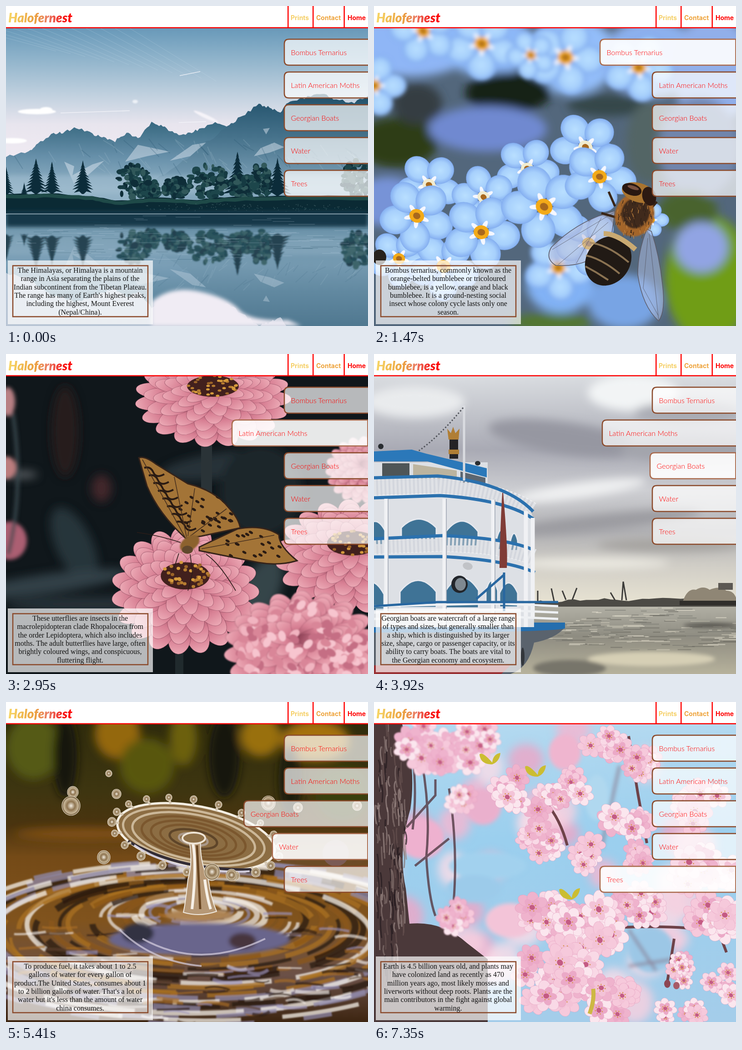
An HTML page that plays this animation: 796x703 px, repeating every 8110 ms.

```html
<!DOCTYPE html>
<html lang="en">
<head>
<meta charset="utf-8">
<title>Halofernest</title>
<style>
html, body { margin: 0; width: 100%; height: 100%; overflow: hidden; background: #fff; }
svg { display: block; width: 100%; height: 100%; }
.nav { font: 700 14px Inter, sans-serif; }
.logo { font: italic 900 28px Lato, sans-serif; }
.menu { font: 300 16px Lato, sans-serif; fill: #f00; }
.caption { font: 16px "Liberation Serif", serif; fill: #111; text-anchor: middle; }
</style>
</head>
<body>
<svg id="stage" viewBox="0 0 796 703" xmlns="http://www.w3.org/2000/svg"></svg>
<script>
const LOOP = 8110, STEP = 45.5, SLIDE = 500, REACH = 115;
const cuts = [1010, 2440, 3920, 5410, 6840];
const starts = [982, 2424, 3890, 5325, 6830];
const labels = ['Bombus Ternarius', 'Latin American Moths', 'Georgian Boats', 'Water', 'Trees'];
const captions = [
  "The Himalayas, or Himalaya is a mountain|range in Asia separating the plains of the|Indian subcontinent from the Tibetan Plateau.|The range has many of Earth's highest peaks,|including the highest, Mount Everest|(Nepal/China).",
  'Bombus ternarius, commonly known as the|orange-belted bumblebee or tricoloured|bumblebee, is a yellow, orange and black|bumblebee. It is a ground-nesting social|insect whose colony cycle lasts only one|season.',
  'These utterflies are insects in the|macrolepidopteran clade Rhopalocera from|the order Lepidoptera, which also includes|moths. The adult butterflies have large, often|brightly coloured wings, and conspicuous,|fluttering flight.',
  'Georgian boats are watercraft of a large range|of types and sizes, but generally smaller than|a ship, which is distinguished by its larger|size, shape, cargo or passenger capacity, or its|ability to carry boats. The boats are vital to|the Georgian economy and ecosystem.',
  "To produce fuel, it takes about 1 to 2.5|gallons of water for every gallon of|product.The United States, consumes about 1|to 2 billion gallons of water. That's a lot of|water but it's less than the amount of water|china consumes.",
  'Earth is 4.5 billion years old, and plants may|have colonized land as recently as 470|million years ago, most likely mosses and|liverworts without deep roots. Plants are the|main contributors in the fight against global|warming.'
];

// Drawing helpers
let state = 4217;
const rand = () => (state = state * 16807 % 2147483647) / 2147483647;
const pick = list => { const all = list.split(' '); return all[Math.floor(rand() * all.length)]; };
const times = (n, fn) => Array.from({ length: n }, (_, i) => fn(i)).join('');
const path = (d, fill, more = '') => `<path d="${d}" fill="${fill}" ${more}/>`;
const line = (d, color, w, more = '') => path(d, 'none', `stroke="${color}" stroke-width="${w}" ${more}`);
const oval = (x, y, rx, ry, fill, turn = 0, more = '') =>
  `<ellipse cx="${x}" cy="${y}" rx="${rx}" ry="${ry}" fill="${fill}" transform="rotate(${turn} ${x} ${y})" ${more}/>`;
const box = (x, y, w, h, fill, more = '') => `<rect x="${x}" y="${y}" width="${w}" height="${h}" fill="${fill}" ${more}/>`;
const at = (x, y, body, more = '') => `<g transform="translate(${x} ${y}) ${more}">${body}</g>`;
const soft = (r, body) => `<g filter="url(#blur${r})">${body}</g>`;
const each = (text, fn) => text.split(',').map(s => fn(...s.trim().split(' ').map(v => isNaN(v) ? v : +v))).join('');
const blobs = text => each(text, oval);
const fade = (id, stops) => '<linearGradient id="' + id + '" gradientUnits="userSpaceOnUse" x1="0" x2="0" y1="0" y2="703">' +
  each(stops, (y, c) => `<stop offset="${y / 703}" stop-color="${c}"/>`) + '</linearGradient>';
const back = fill => box(0, 49, 796, 654, fill);
const scatter = (n, x, y, rx, ry, fn) => times(n, () => {
  const a = rand() * 7, q = Math.sqrt(rand());
  return fn(x + Math.cos(a) * q * rx, y + Math.sin(a) * q * ry);
});
const ring = (n, dist, rx, ry, fill, more = '') => times(n, i =>
  `<ellipse cx="${dist}" rx="${rx}" ry="${ry}" fill="${fill}" transform="rotate(${i * 360 / n})" ${more}/>`);

function ridge(text, rough) {
  const p = text.split(' ').map(s => s.split(',').map(Number));
  return 'M' + p[0] + p.slice(1).map(([x, y], i) => times(6, k => {
    const f = (k + 1) / 6, [u, v] = p[i];
    return `L${u + (x - u) * f} ${v + (y - v) * f + (rand() - .5) * rough}`;
  })).join('');
}

function conifer(x, y, h) {
  let right = '', left = '';
  for (let i = 1; i < 11; i++) {
    const w = h * .033 * i * (.75 + rand() * .4), v = y - h + h * i / 11;
    right += `L${x + w} ${v + 4}L${x + w * .4} ${v + 1}`;
    left = `L${x - w * .4} ${v + 1}L${x - w} ${v + 4}` + left;
  }
  return path(`M${x} ${y - h}${right}L${x + 2} ${y}H${x - 2}${left}Z`, '#0c2c3a');
}

const bush = (x, y, rx, ry) => scatter(90, x, y, rx, ry, (u, v) =>
  oval(u, v, 3 + rand() * 6, 3 + rand() * 5, pick('#0e2d38 #153a42 #1d464b #31585a')));

function mountains() {
  const land =
    path(ridge('0,332 50,320 70,303 105,279 125,279 155,266 190,282 215,288 240,297 265,280 290,291 320,257 345,262 370,281 400,280 425,272 460,255 490,264 600,330', 7) + 'V460H0Z', 'url(#far)') +
    path(ridge('310,395 390,340 440,300 490,264 520,240 556,217 580,222 600,236 620,212 650,205 690,191 720,202 760,214 796,196', 7) + 'V460H310Z', 'url(#near)') +
    path('M128 342L150 352L146 372L190 348L216 340L180 372L150 392ZM290 305L360 320L310 330L262 342ZM410 305L440 300L405 330L360 340ZM545 330L560 312L590 300L612 310L580 322ZM565 270L580 268L572 282Z', '#e4ebf3', 'opacity=".45"') +
    scatter(60, 400, 325, 390, 35, (x, y) => line(`M${x} ${y}l${8 + rand() * 22} ${12 + rand() * 18}`, pick('#214e69 #a9c2d2'), 2, 'opacity=".22"')) +
    soft(8, box(0, 372, 796, 40, '#a5c0d2', 'opacity=".5"'));
  const woods = each('0 415 62,40 415 28,66 413 78,101 412 70,169 413 74,509 418 98,597 417 84', conifer) +
    each('279 386 36 38,318 404 18 20,372 400 26 24,445 386 44 38,520 396 26 28,560 384 20 40,770 380 32 42', bush);
  return fade('dawn', '49 #6899b9,120 #92b5cc,200 #c3d2e0,260 #e8e5ee,340 #f1ebf3') +
    fade('far', '255 #376880,330 #668fa9,400 #92b2c6') + fade('near', '195 #20506a,290 #47738c,400 #83a6bc') +
    fade('lake', '457 #133c4a,490 #4e7a92,570 #84a6bc,703 #7f9fb5') + back('url(#dawn)') +
    times(12, i => line(`M${-80 + i * 32} 49l190 ${50 + i * 6}`, '#d7e7f2', 1, 'opacity=".22"')) +
    soft(3, blobs('68 232 42 6 #fff,88 228 14 6 #fff,14 296 32 6 #fff,284 210 6 4 #edf1f7,440 243 30 4 #f5f3f8 25')) +
    line('M120 235L272 230M382 153L427 144M380 256L440 254', '#f5f5fa', 1.6, 'opacity=".8"') +
    `<g id="land">${land}</g><g id="woods">${woods}</g>` +
    path(ridge('0,413 100,412 190,418 240,428 330,421 420,426 480,420 620,417 796,417', 3) + 'V460H0Z', '#0b2a34') +
    line(ridge('0,418 100,417 190,423 240,433 330,426 420,431 480,425 620,422 796,422', 3), '#1f4a48', 8) +
    scatter(120, 520, 443, 270, 9, (x, y) => oval(x, y, 1, 1, '#527073', 0, 'opacity=".6"')) +
    box(0, 457, 796, 246, '#e9e5ef') + '<g transform="translate(0 918) scale(1 -1)"><use href="#land"/></g>' +
    box(0, 457, 796, 246, 'url(#lake)', 'opacity=".45"') +
    soft(8, path('M320 703V650Q360 615 420 626Q490 640 515 670Q540 693 620 690L650 703Z', '#f0ecf4') + box(0, 450, 796, 35, '#12394a')) +
    soft(3, '<g transform="translate(0 896) scale(1 -.95)" opacity=".8"><use href="#woods"/></g>') +
    box(0, 456, 796, 1.5, '#c3d6e0', 'opacity=".8"') +
    scatter(150, 400, 510, 400, 52, (x, y) => line(`M${x} ${y}h${15 + rand() * 50}`, pick('#c4d8e4 #1d4a5d'), 1, 'opacity=".28"'));
}

const bloom = (x, y, r, turn = 0, pale = 0) => at(x, y,
  ring(5, r * .59, r * .43, r * .4, 'url(#sepal)', 'stroke="#7ba6e8" stroke-opacity=".5"') + ring(5, r * .2, r * .15, r * .06, '#f5f7ff') +
  oval(0, 0, r * .2, r * .19, pale ? '#f1ecd0' : '#f3aa18') + oval(0, 0, r * .1, r * .09, '#a8681d'), `rotate(${turn}) scale(1 .95)`);

function bee() {
  const wing = 'fill-opacity=".55" stroke="#5b5a66" stroke-width="1.5"';
  return path('M530 450Q450 470 390 530Q375 555 400 570Q480 575 520 520Z', '#bcc0da', wing) +
    path('M600 490Q580 540 580 590Q590 660 626 692Q642 670 634 610Q628 550 610 495Z', '#aebde2', wing) +
    line('M530 452L392 535M515 475L405 568M500 465L445 565M605 500L626 690M602 510L592 620L625 680', '#51505c', 1, 'opacity=".7"') +
    line('M535 465L500 455M530 440L516 408M605 450L622 430', '#392516', 5) + oval(515, 560, 48, 57, '#211a15', 35) +
    line('M475 520Q515 525 560 563M466 548Q500 555 540 588M465 572Q490 585 515 602', '#a68a62', 4, 'opacity=".8"') +
    line('M505 500Q535 500 575 535', '#c9aa72', 11) + soft(3, blobs('573 459 43 48 #a36529 20,575 455 31 34 #3f2a1d 20')) +
    scatter(80, 573, 462, 42, 46, (x, y) => line(`M${x} ${y}l${rand() * 6 - 3} 7`, pick('#c58840 #7b4d25 #2e2018'), 1.3)) +
    blobs('582 410 38 21 #a9742f 16,567 403 22 13 #281811 18,605 418 15 21 #2d1a12 -15,570 399 13 4 #795140 18');
}

function flowers() {
  return '<radialGradient id="sepal"><stop stop-color="#b9dfff"/><stop offset=".65" stop-color="#a7d0fc"/><stop offset="1" stop-color="#86b0f1"/></radialGradient>' + back('#53677c') +
    soft(20, blobs('80 80 150 75 #8fb6f6,250 85 100 70 #8db8f8,435 110 100 85 #93bdf9,610 115 110 85 #8cb0ee,745 140 90 120 #91afea,295 190 95 45 #182015,50 300 90 55 #2f3e12,95 215 55 45 #343c42,515 218 90 24 #35464a,250 270 130 50 #7089d0,605 300 50 90 #536565,715 310 90 110 #7185ac,735 600 95 140 #709d13,690 450 65 45 #4a632d,410 610 75 65 #82b2f5,550 650 80 60 #78a4e4,720 530 58 55 #91a4e3,30 430 75 55 #7793d7,390 695 90 20 #52772f')) +
    soft(8, each('237 83 82 20,421 113 85 5,108 55 75 40,582 135 78 10,0 175 70,345 108 55 30,405 575 75 12', bloom)) +
    each('472 522 72 20,121 393 72 20 1,465 310 78 25 1,337 357 70 10 1,55 555 66 15,153 572 78 20,241 420 70 40 1,610 470 38,94 461 82 24,236 497 84 8,374 441 94 33,496 375 80 10', bloom) +
    oval(12, 552, 15, 17, '#27221d') + bee();
}

function zinnia(x, y, r, squash, heart = 1) {
  return at(x, y, times(6, i => at(0, -i * r * .04, ring(19 - i * 2, r * (.78 - i * .12), r * .25, r * (.155 - i * .008), 'url(#pink)',
    'stroke="#75344a" stroke-opacity=".5"'), `rotate(${i * 11 + rand() * 8})`)) +
    (heart ? oval(0, -r * .24, r * .34, r * .22, '#42201d') +
      scatter(38, 0, -r * .25, r * .33, r * .22, (u, v) => oval(u, v, 4, 4, pick('#d59a3c #9c6428 #b77d31'))) : ''), `scale(1 ${squash})`);
}

function butterfly() {
  const wings = 'M292 228Q305 223 330 242L400 285Q460 300 490 338Q512 362 515 382L430 400L395 405Q335 350 310 290ZM425 424L510 384Q565 374 600 397Q600 422 640 454Q600 466 555 458L425 432Z';
  const spot = (x, y) => oval(x, y, 5, 2.7, '#2a1b13', 30);
  return `<clipPath id="wings"><path d="${wings}"/></clipPath>` + path(wings, '#a37437', 'stroke="#35231a" stroke-width="3"') +
    `<g clip-path="url(#wings)">${scatter(30, 445, 350, 65, 45, spot)}${scatter(24, 555, 425, 80, 34, spot)}` +
    times(8, i => line(`M${304 + i * 10} ${250 + i * 17}q14 -4 20 10t24 4`, '#2a1b13', 4)) +
    line('M395 405L300 232M397 402L370 270M400 400L415 295M405 400L485 340M430 428L590 398', '#49311f', 1.6) + '</g>' +
    soft(3, oval(404, 416, 24, 15, '#8c622d', -35)) + oval(399, 430, 12, 9, '#61482d') +
    line('M384 414Q330 397 288 392M440 440Q470 460 505 520M380 438L368 475M405 440L410 480L400 520', '#2b1d19', 1.6);
}

function moths() {
  return '<linearGradient id="pink"><stop stop-color="#8c3f54"/><stop offset=".55" stop-color="#d77f93"/><stop offset="1" stop-color="#eca9b5"/></linearGradient>' + back('#10171b') +
    soft(20, blobs('130 170 30 100 #271d1d,210 295 22 30 #42272b,470 245 130 28 #263337 -8,150 420 40 90 #25343a -25,90 505 180 22 #334147 -8,560 520 40 80 #344449 25,560 300 90 100 #1c272b,30 265 40 8 #5e6367,200 550 200 18 #263238')) +
    soft(8, blobs('8 410 38 42 #ab5e72,4 105 16 32 #b88084,2 250 20 25 #bb7d7e') + line('M15 130Q40 300 5 440', '#3b4a50', 7)) +
    box(429, 165, 24, 150, '#2a3337') + box(372, 630, 18, 73, '#202a2d') +
    soft(3, zinnia(785, 255, 80, .9, 0)) + each('455 96 167 .63,762 445 165 .74,394 520 158 .86', zinnia) +
    soft(3, zinnia(652, 650, 168, .75, 0) + scatter(120, 652, 645, 145, 95, (x, y) => oval(x, y, 12, 8, pick('#f1b4c0 #d98698 #f7c5cf #c56e84'), rand() * 180))) + butterfly();
}

function boats() {
  const rail = d => line(d, '#f7f7f8', 36, 'stroke-dasharray="5 4"') + line(d, '#c9cdd5', 34, 'opacity=".5"');
  const arch = (x, y, w, h) => path(`M${x} ${y + h}V${y + h * .45}Q${x + w / 2} ${y - h * .35} ${x + w} ${y + h * .45}V${y + h}Z`, '#3f7396', 'stroke="#e5e8ee" stroke-width="3"');
  return fade('grey', '49 #d9dce0,140 #bfc1c8,210 #a9aab4,300 #cdced2,390 #b2b2b5,470 #d2cfc7,553 #e9e4d3') +
    fade('river', '553 #b2b0a5,620 #8e8c81,703 #b7b29c') + back('url(#grey)') +
    soft(20, blobs('570 85 100 40 #f2f4f5,90 105 110 35 #e9ebed,420 185 170 35 #9697a1 8,700 210 160 28 #a3a4ac,450 300 150 17 #eff0f1 -8,500 370 220 18 #9b9ba0 -6,690 130 120 25 #a9abb3,480 460 170 12 #eceae2,650 420 160 14 #a4a29f')) +
    path(ridge('350,542 400,544 480,538 560,541 650,535 796,540', 5) + 'V556H350Z', '#4c4a45') +
    line('M545 541L548 500L555 541M390 515L396 543M360 520V543M414 520L422 540M436 540L446 514M520 524L530 541', '#3c3b39', 3) +
    path('M680 541Q690 514 708 518Q724 508 738 518Q760 508 775 520Q790 520 796 535V545H680Z', '#8f8675') + box(757, 503, 32, 15, '#5c5853') +
    box(0, 555, 796, 148, 'url(#river)') + box(672, 542, 124, 10, '#302e2b') +
    scatter(150, 590, 605, 230, 48, (x, y) => line(`M${x} ${y}h${10 + rand() * 45}`, pick('#e7e2d1 #69685f #d2cebd #7b7a72'), 2, 'opacity=".6"')) +
    soft(8, blobs('610 670 140 16 #d6cfb5,430 690 80 18 #77756a,740 596 60 5 #53514b')) +
    path('M0 600H420Q400 625 352 634Q340 690 300 703H0Z', '#5a636d') + path('M0 590H420V603Q380 612 0 612Z', '#246eae') + path('M0 684H300L280 703H0Z', '#9a3336') +
    path('M0 238H250V290Q330 300 350 360L352 600H0Z', '#dde0e5') + path('M0 214L83 210L115 219L248 251V271L118 236H0Z', '#2b78b9') +
    box(18, 240, 60, 28, '#4e5557') + path('M86 242L182 256V274H86Z', '#bcb49f') + path('M190 258L245 272V283H190Z', '#5c6670') +
    rail('M0 293L140 288Q280 300 348 344') + each('-20 365 45 54,60 360 77 48,158 364 71 58,270 384 20 46,300 392 16 40', arch) +
    rail('M0 422L150 416Q290 420 350 446') + each('-35 498 57 66,57 494 80 63,158 488 72 70,246 495 26 55,276 500 40 56', arch) +
    line('M0 272L140 268Q290 282 350 346M0 316L145 311Q290 320 350 362M0 406L150 399Q290 404 350 430M0 446L150 445Q290 452 354 480', '#2b71ae', 7) +
    line('M27 318V600M155 318V600M262 320V600M334 345V600M349 360V580', '#f0f1f4', 9) + line('M31 318V600M159 318V600M266 320V600', '#aeb4bf', 2) +
    times(3, i => line(`M0 ${554 + i * 14}L270 ${548 + i * 14}L405 ${554 + i * 14}`, '#eef0f3', 5)) + line('M0 554L140 545H405M286 480V565M286 485L225 538', '#2867a0', 5) +
    line('M198 113V278', '#d9dbe0', 5) + line('M196 118Q145 180 98 213', '#51545b', 3, 'stroke-dasharray="3 4"') +
    box(166, 176, 19, 54, '#252326') + path('M164 188L161 164L169 174L174 160L179 174L188 164L186 188ZM164 210H187V220H164Z', '#b07e35') +
    path('M282 305Q277 390 276 470H292Q295 430 284 305Z', '#803c36') +
    blobs('188 506 18 19 #22252a,190 506 12 14 #7f8991,206 466 11 8 #c1c3c7 15,15 203 6 6 #292d31,228 240 6 5 #292d31,327 665 4 20 #32363b');
}

function water() {
  const drop = (x, y, r) => oval(x, y, r, r * 1.05, 'url(#bead)', 0, 'stroke="#e8ddcc" stroke-width="1.2"');
  const crown = times(21, i => {
    const c = Math.cos(i * .3 + .1), s = Math.sin(i * .3 + .1);
    return line(`M${172 * c} ${66 * s}L${187 * c} ${79 * s}`, '#d5c8b3', 5) + drop(188 * c, 80 * s, 7 + (s > 0 ? 4 : 1) * rand());
  });
  return '<radialGradient id="bead"><stop stop-color="#f4eee2"/><stop offset=".45" stop-color="#8e7450"/><stop offset=".8" stop-color="#c9b89a"/><stop offset="1" stop-color="#59411f"/></radialGradient>' +
    fade('pond', '49 #302c0c,190 #3d3510,270 #4a340f,340 #744a17,480 #80531d,600 #6b5047,703 #3d2511') + back('url(#pond)') +
    soft(20, blobs('60 100 60 70 #555a12,245 70 50 55 #94670f,310 140 60 60 #59570f,390 80 30 60 #6c6010,560 75 45 45 #99700f,680 85 75 45 #a5710c,130 120 26 90 #15150a,480 120 34 90 #16180a,625 170 26 80 #1b1a0a,740 200 60 60 #39400d,180 290 160 14 #7f5014,700 350 120 24 #6c4b28')) +
    soft(3, times(30, i => oval(425, 456 + i * 2.5, 55 + i * 18, 17 + i * 5.6, 'none', rand() * 4 - 2,
      `stroke="${pick('#e9e2dc #8b5719 #2a1a10 #8f88a9 #aa701f #f6f1e8')}" stroke-width="${7 + rand() * 8}" stroke-dasharray="${60 + rand() * 160} ${25 + rand() * 90}" opacity=".75"`)) +
      scatter(120, 390, 570, 430, 130, (x, y) => line(`M${x} ${y}q25 ${rand() * 24 - 12} ${30 + rand() * 60} ${rand() * 12 - 6}`, pick('#f5f0ed #2a1912 #9b94bf #a96e24 #5a402d'), 3 + rand() * 5, 'opacity=".65"'))) +
    soft(8, blobs('425 522 200 36 #69658c,290 508 35 22 #333042,520 525 30 18 #46363c,425 468 75 14 #ad8352')) +
    line('M300 520Q425 590 570 520M250 500Q320 570 430 580', '#d8d1e2', 4, 'opacity=".7"') +
    at(418, 296, oval(0, 0, 176, 67, '#8c6d43', 0, 'stroke="#f4eee2" stroke-width="5"') +
      times(7, i => oval(-5, 1 + i, 158 - i * 21, 57 - i * 7.5, 'none', 0, `stroke="${pick('#e0d1b5 #4f3820 #b4a7a0 #765027')}" stroke-width="5" opacity=".75"`)) +
      line('M-145 38Q-20 82 140 46', '#332d36', 6) + line('M-130 44Q-20 90 130 52', '#d1ccdc', 4) + crown, 'rotate(11)') +
    path('M402 300Q412 350 400 390Q395 440 390 462Q425 473 463 460Q450 430 445 390Q425 350 428 300Z', '#b69876', 'stroke="#efe9df" stroke-width="2"') +
    line('M411 310Q420 360 409 455M437 390Q442 430 450 455', '#f7f1e8', 6) + line('M420 315Q424 400 427 455', '#684521', 5) +
    oval(413, 299, 25, 12, '#8f7149', 0, 'stroke="#eee4d5" stroke-width="4"') +
    each('226 157 7,147 198 12,143 228 20,243 202 10,215 341 14,577 222 15,642 232 10,772 228 10,453 373 17,496 380 12', drop) +
    oval(725, 332, 29, 29, '#8a6d86', 0, 'opacity=".5"');
}

const cherry = (x, y, r) => at(x, y,
  ring(7, r * .58, r * .42, r * .33, pick('#f6c9db #f9d9e6 #efb3cd #fbe6ee'), 'stroke="#df94b8" stroke-opacity=".45"') +
  ring(5, r * .3, r * .3, r * .22, pick('#f3c3d7 #eba9c7')) + oval(0, 0, r * .16, r * .16, '#c45b83') + ring(7, r * .24, 1.5, 1.5, '#d99654'),
  `rotate(${rand() * 72}) scale(1 .88)`);

function trees() {
  const bunch = (n, x, y, rx, ry, r) => scatter(n, x, y, rx, ry, (u, v) => cherry(u, v, r * (.8 + rand() * .4)));
  const leaf = (x, y) => path(`M${x} ${y}q-22 -25 -28 -18q2 22 28 22q16 -6 18 -25q-16 2 -18 21Z`, '#cbbd32');
  return fade('noon', '49 #b3d9f0,300 #9bcfee,703 #a4cdea') + back('url(#noon)') +
    soft(20, scatter(34, 400, 370, 400, 340, (x, y) => oval(x, y, 30 + rand() * 25, 28 + rand() * 20, pick('#f1b8d2 #f6d0e0 #eaa8c8 #f7dce8'), 0, 'opacity=".85"'))) +
    soft(8, blobs('105 300 50 45 #eeb1cf,240 230 40 40 #eab0cd,300 480 55 38 #f3c4d8,420 110 36 40 #efb5cf,250 360 85 30 #a2d1ee,220 410 60 30 #9ccbea,490 210 26 50 #b0d8ef,610 545 50 50 #9cc7e6') +
      line('M540 140L500 320M560 500L620 590M560 580L660 565', '#866e81', 6, 'opacity=".7"')) +
    line('M85 120Q95 200 85 280M105 130Q125 240 115 340Q120 430 135 470M72 275L135 205V170M90 360L165 300M165 190Q185 320 175 440L155 470', '#5a414c', 5, 'opacity=".85"') +
    path('M0 49H62Q94 140 80 235Q52 330 70 410L78 487Q150 480 205 530L250 565V703H0Z', '#4b393a') +
    scatter(150, 35, 310, 35, 280, (x, y) => line(`M${x} ${y}q${rand() * 12 - 6} 12 2 ${20 + rand() * 28}`, pick('#251b1f #83706e #65504f #9b8986'), 3, 'opacity=".7"')) +
    line('M360 205Q405 240 425 315M560 75L580 200L600 310M545 495Q690 490 735 505M660 520L645 615M760 510L775 550', '#6e4248', 6) +
    soft(3, each('14 120 95 55 45 34,7 218 95 45 45 32,4 175 210 35 28 25,5 175 470 28 22 24', bunch)) +
    each('9 335 200 58 45 30,7 425 195 35 32 29,8 370 300 40 40 29,4 470 330 32 35 34,6 510 92 40 32 30,5 590 145 25 30 27,6 555 260 35 35 32,5 585 340 35 20 30,9 735 230 60 45 36,10 720 365 80 45 36,10 750 465 50 35 38', bunch) +
    each('7 580 450 50 32 32,15 395 470 55 45 36,13 480 490 55 65 38,18 395 600 75 70 38,8 525 660 65 36 34,8 660 580 28 55 19,5 760 620 40 45 26,5 670 682 60 20 26', bunch) +
    each('435 430,360 160,260 133', leaf) + line('M482 630Q485 655 474 685', '#cdb844', 9) + blobs('645 619 7 9 #8d4653,665 623 7 8 #a75b67');
}

// Page
const scenes = [mountains, flowers, moths, boats, water, trees];
const stage = document.getElementById('stage');
const lines = text => text.split('|').map((s, i) => `<text class="caption" x="163" y="${585.7 + i * 18.4}">${s}</text>`).join('');
stage.innerHTML =
  each('3,8,20', r => `<filter id="blur${r}" filterUnits="userSpaceOnUse" x="-80" y="-30" width="956" height="810"><feGaussianBlur stdDeviation="${r / 2}"/></filter>`) +
  '<linearGradient id="brand">' + each('0 #f7d766,.42 #eba03f,.62 #ea7c66,.85 #f51a18,1 #f00', (o, c) => `<stop offset="${o}" stop-color="${c}"/>`) + '</linearGradient>' +
  scenes.map((draw, i) => `<g class="scene">${draw()}${box(4, 559, 319, 140, '#fff', 'fill-opacity=".7"')}${box(15, 570.5, 297, 112, 'none', 'stroke="#8b4a2b" stroke-width="2.5"')}${lines(captions[i])}</g>`).join('') +
  labels.map((s, i) => `<g class="item"><path stroke-width="2.5"/><text class="menu" y="${107.5 + i * 72}">${s}</text></g>`).join('') +
  box(0, 0, 796, 49, '#fff') + box(0, 46.5, 796, 2.5, '#f00') + each('619,674,742.5', x => box(x, 0, 2.5, 47, '#f00')) +
  '<text class="logo" x="5" y="36" fill="url(#brand)">Halofernest</text>' +
  each('Prints 626 #f5cf66,Contact 682 #eea33b,Home 751 #f00', (s, x, c) => `<text class="nav" x="${x}" y="30.5" fill="${c}">${s}</text>`);

const views = stage.querySelectorAll('.scene'), items = stage.querySelectorAll('.item');

// Cubic curve (.25, .1, .25, 1)
function ease(x) {
  if (x <= 0 || x >= 1) return x <= 0 ? 0 : 1;
  let lo = 0, hi = 1;
  for (let i = 0; i < 24; i++) {
    const t = (lo + hi) / 2, u = 1 - t;
    if (.75 * u * u * t + .75 * u * t * t + t ** 3 < x) lo = t; else hi = t;
  }
  const u = 1 - lo;
  return .3 * u * u * lo + 3 * u * lo * lo + lo ** 3;
}

function progress(i, t) {
  if (i >= cuts.length || t < cuts[i]) return 0;
  const held = cuts[i] + Math.floor((t - cuts[i]) / STEP) * STEP;
  return ease((held - starts[i]) / SLIDE);
}

function render(t) {
  const current = cuts.filter(c => t >= c).length;
  views.forEach((v, i) => v.style.display = i === current ? '' : 'none');
  items.forEach((item, i) => {
    const [shape, label] = item.children, active = i === current - 1;
    const x = 612 - REACH * (progress(i, t) - progress(i + 1, t)), y = 73 + i * 72, right = active ? 795.5 : 812;
    shape.setAttribute('d', `M${right} ${y}H${x + 10}Q${x} ${y} ${x} ${y + 10}v37q0 10 10 10H${right}${active ? 'Z' : ''}`);
    shape.setAttribute('fill', `rgba(255,255,255,${active ? .9 : .7})`);
    shape.setAttribute('stroke', active ? '#a9694b' : '#8b4a2b');
    label.setAttribute('x', x + 14.5);
  });
}

const begin = performance.now();
function tick() {
  render((performance.now() - begin) % LOOP);
  requestAnimationFrame(tick);
}
tick();
</script>
</body>
</html>
```
